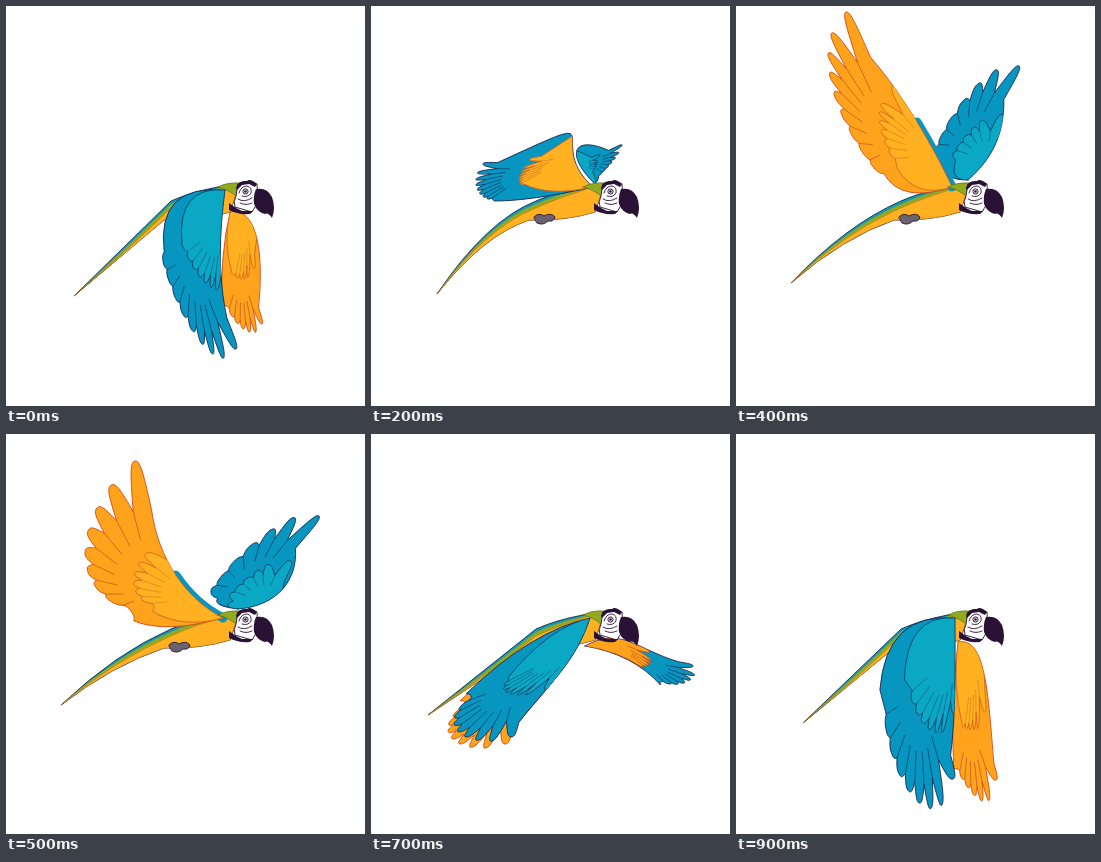
These frames come from a looping animation (359 by 400 pixels, 1000 ms). An HTML page:

```html
<!DOCTYPE html>
<html lang="en">
<head>
<meta charset="utf-8">
<title>Flying macaw</title>
<style>
html, body { margin: 0; width: 100%; height: 100%; overflow: hidden; background: #fff; }
svg { display: block; width: 359px; height: 400px; }
path { stroke-linejoin: round; stroke-linecap: round; }
</style>
</head>
<body>
<svg id="stage" viewBox="0 0 359 400"></svg>
<script>
const INK = '#2a1236', GREEN = '#93a91f';
// fill, outline, feather line
const COLORS = {
  b: ['#0796c0', '#17264f', '#0b4470'],
  t: ['#0ba8c5', '#123f6b', '#0c6187'],
  o: ['#ffa21c', '#cf4a18', '#c2601a'],
  y: ['#ffb122', '#d4661a', '#d9801a']
};

// Key poses. A wing is: shoulder, two bends of the leading edge,
// four points of the curve that holds the feather tips, bend of the trailing edge.
// Its colours are flight feathers, coverts and, if it shows, the underside.
const KEYS = [
  { step: 0, tip: '68,290', bend: 0,
    far: ['oy', '224,206 252,200 258,250 256,318 250,335 232,325 220,300 214,250'],
    near: ['bt', '219,184 213,230 212,270 230,343 212,375 172,315 157,255 150,178'] },
  { step: 2, tip: '66,288', bend: 27,
    far: ['bt', '224,178 195,150 200,128 251,139 248,150 238,160 230,168 228,174'],
    near: ['by', '222,181 170,135 250,100 112,158 100,172 103,192 122,194 160,195'] },
  { step: 4, tip: '55,277', bend: 17,
    far: ['bt', '232,174 262,148 268,120 283,60 255,50 208,112 199,146 205,175'],
    near: ['oy', '216,181 198,142 168,90 110,6 75,35 95,110 139,163 165,198'] },
  { step: 5, tip: '55,271', bend: 14,
    far: ['bt', '232,175 272,172 292,145 313,82 285,70 222,125 205,158 206,172'],
    near: ['oy', '217,184 180,165 152,125 129,27 85,60 45,150 125,177 160,200'] },
  { step: 7, tip: '57,281', bend: 0,
    far: ['bo', '214,212 250,192 265,215 322,232 330,245 310,255 290,248 262,220'],
    near: ['bto', '219,184 205,228 178,250 140,303 110,315 55,300 100,262 160,197'] },
  { step: 8, tip: '63,289', bend: 0,
    far: ['oy', '222,208 250,200 262,250 300,338 285,352 235,332 218,308 212,260'],
    near: ['bt', '219,184 219,230 214,280 206,328 190,385 145,375 130,302 155,178'] },
  { step: 9, tip: '67,289', bend: 0,
    far: ['oy', '222,208 250,202 252,260 260,346 255,390 230,355 221,335 214,270'],
    near: ['bt', '219,184 219,230 220,280 217,345 205,410 152,360 147,268 150,178'] }
];
const STEP = 100, COUNT = 10;

const points = s => s.split(' ').map(p => p.split(',').map(Number));
const mix = (a, b, k) => a.map((v, i) => v + (b[i] - v) * k);
const add = (a, b, k = 1) => a.map((v, i) => v + b[i] * k);
const xy = (...ps) => ps.map(p => p.map(v => v.toFixed(1)).join(' ')).join(' ');
const path = (d, fill, line = 'none', w = 0.9) =>
  `<path d="${d}" fill="${fill}" stroke="${line}" stroke-width="${w}"/>`;

// Control points of the part of a Bezier curve from 0 to t.
function split(curve, t) {
  const left = [curve[0]];
  while (curve.length > 1) {
    curve = curve.slice(1).map((p, i) => mix(curve[i], p, t));
    left.push(curve[0]);
  }
  return left;
}
const at = (curve, t) => split(curve, t).pop();

function mirror(p, tip, hub) {
  const axis = add(tip, hub, -1), rel = add(p, tip, -1);
  const k = (axis[0] * rel[0] + axis[1] * rel[1]) / (axis[0] ** 2 + axis[1] ** 2);
  return mix(p, add(tip, axis, k), 2);
}

// Rounded feather ends; the gaps between them point to the hub and get shallower inwards.
function fan(tips, hub) {
  const gaps = tips.slice(1).map((tip, i) => {
    const depth = 0.05 + 0.27 * (1 - i / (tips.length - 2)) ** 2;
    return mix(mix(tips[i], tip, 0.5), hub, depth);
  });
  const edge = [mirror(gaps[0], tips[0], hub), ...gaps, mirror(gaps.at(-1), tips.at(-1), hub)];
  const d = tips.map((tip, i) => {
    const a = edge[i], b = edge[i + 1], side = add(a, b, -1);
    const p = add(tip, side, 0.3), q = add(tip, side, -0.3);
    return `C${xy(mix(a, p, 0.7), p, tip)}C${xy(q, mix(b, q, 0.7), b)}`;
  }).join('');
  const rays = gaps.map(g => `M${xy(g)}L${xy(mix(g, hub, 0.35))}`).join('');
  return { start: edge[0], d, rays };
}

let clips = 0;
function wing([colors, p], count) {
  const [shoulder, bend1, bend2] = p, curve = p.slice(3, 7), back = p[7];
  const [flight, covert, under] = [...colors].map(c => COLORS[c]);
  const lead = [shoulder, bend1, bend2, curve[0]];
  const tips = Array.from({ length: count }, (_, i) => at(curve, (i / (count - 1)) ** 0.8));

  const outer = fan(tips, mix(at(lead, 0.45), curve[3], 0.5));
  const shape = `M${xy(shoulder)}C${xy(bend1, bend2, outer.start)}${outer.d}Q${xy(back, shoulder)}Z`;

  const root = at(lead, 0.25);
  const inner = fan(tips.filter((_, i) => i !== 1).map((t, i) => mix(t, root, 0.52 - 0.17 * i / (count - 2))), root);
  const half = split([shoulder, bend1, bend2, outer.start], 0.5);
  const cover = `M${xy(shoulder)}C${xy(...half.slice(1))}L${xy(inner.start)}${inner.d}Q${xy(mix(back, shoulder, 0.3), shoulder)}Z`;

  const id = 'wing' + clips++;
  const rim = colors[0] === 'o' && count > 7
    ? path(`M${xy(shoulder)}C${xy(...half.slice(1))}`, 'none', COLORS.b[0], 9) : '';
  const below = under ? `<g transform="translate(-6 7)">${path(shape, under[0], under[1])}</g>` : '';
  return rim + below + path(shape, flight[0], flight[1]) + path(outer.rays, 'none', flight[2], 0.8) +
    `<clipPath id="${id}"><path d="${shape}"/></clipPath><g clip-path="url(#${id})">` +
    path(cover, covert[0], covert[1]) + path(inner.rays, 'none', covert[2], 0.7) + '</g>';
}

// Trunk and tail in layers from the blue back to the yellow belly.
function body(tip, bend) {
  const top = add(mix([165, 195], tip, 0.5), [0, -bend]);
  const low = add(mix([158, 214], tip, 0.5), [0, -bend * 0.8]);
  const layer = drop => `M230 187Q222 178 212 ${181 + drop / 2}Q185 ${186 + drop} 165 ${195 + drop}` +
    `Q${xy(add(top, [0, drop]), tip)}Q${xy(low)} 158 214Q195 215 224 206Z`;
  return path(layer(0), '#1699b4', '#17264f') + path(layer(3), GREEN) +
    path(layer(7), COLORS.y[0], COLORS.y[1], 0.5) +
    path('M163 211Q168 206 173 210Q180 206 184 211Q183 216 177 215Q172 220 166 217Z', '#6b6470', INK);
}

const head =
  path('M212 181Q221 176 234 177L232 192Q224 184 212 181Z', GREEN, '#4f6a1c', 0.6) +
  path('M232 178Q243 173 251 178L252 196L246 206L229 201Q227 196 230 190Z', '#fff', INK) +
  path('M230 182Q232 174 241 175Q244 172 251 178L249 181L243 178L236 179L231 184Z', INK) +
  path('M223 197Q229 202 236 205L247 205L244 208Q232 209 223 204Z', INK) +
  path('M250 183Q261 181 266 191Q270 202 266 212Q262 206 259 208Q251 206 248 198Q247 190 250 183Z', INK) +
  path('M233 187Q235 180 241 180Q246 181 245 187Q242 192 236 190M232 193Q238 197 246 192M234 197Q240 200 246 197', 'none', INK) +
  `<circle cx="239.5" cy="185.5" r="2.6" fill="#fff" stroke="${INK}"/><circle cx="239.5" cy="185.5" r="1.3" fill="${INK}"/>`;

// Steps without a key pose lie halfway between their neighbours.
function pose(step) {
  const i = KEYS.findIndex(k => k.step >= step);
  const b = KEYS[i], a = b.step === step ? b : KEYS[i - 1];
  const half = (s, e) => mix(points(s).flat(), points(e).flat(), 0.5);
  const blend = side => {
    const v = half(a[side][1], b[side][1]);
    return [b[side][0], Array.from({ length: v.length / 2 }, (_, n) => v.slice(2 * n, 2 * n + 2))];
  };
  return wing(blend('far'), 7) + body(half(a.tip, b.tip), (a.bend + b.bend) / 2) + wing(blend('near'), 9);
}

const stage = document.getElementById('stage');
stage.innerHTML = Array.from({ length: COUNT }, (_, i) => `<g visibility="hidden">${pose(i)}</g>`).join('') + head;
const groups = [...stage.children].slice(0, COUNT);
const start = performance.now();

function draw(now) {
  const current = Math.floor(Math.max(0, now - start) / STEP) % COUNT;
  groups.forEach((g, i) => g.setAttribute('visibility', i === current ? 'visible' : 'hidden'));
  requestAnimationFrame(draw);
}
draw(start);
</script>
</body>
</html>
```
